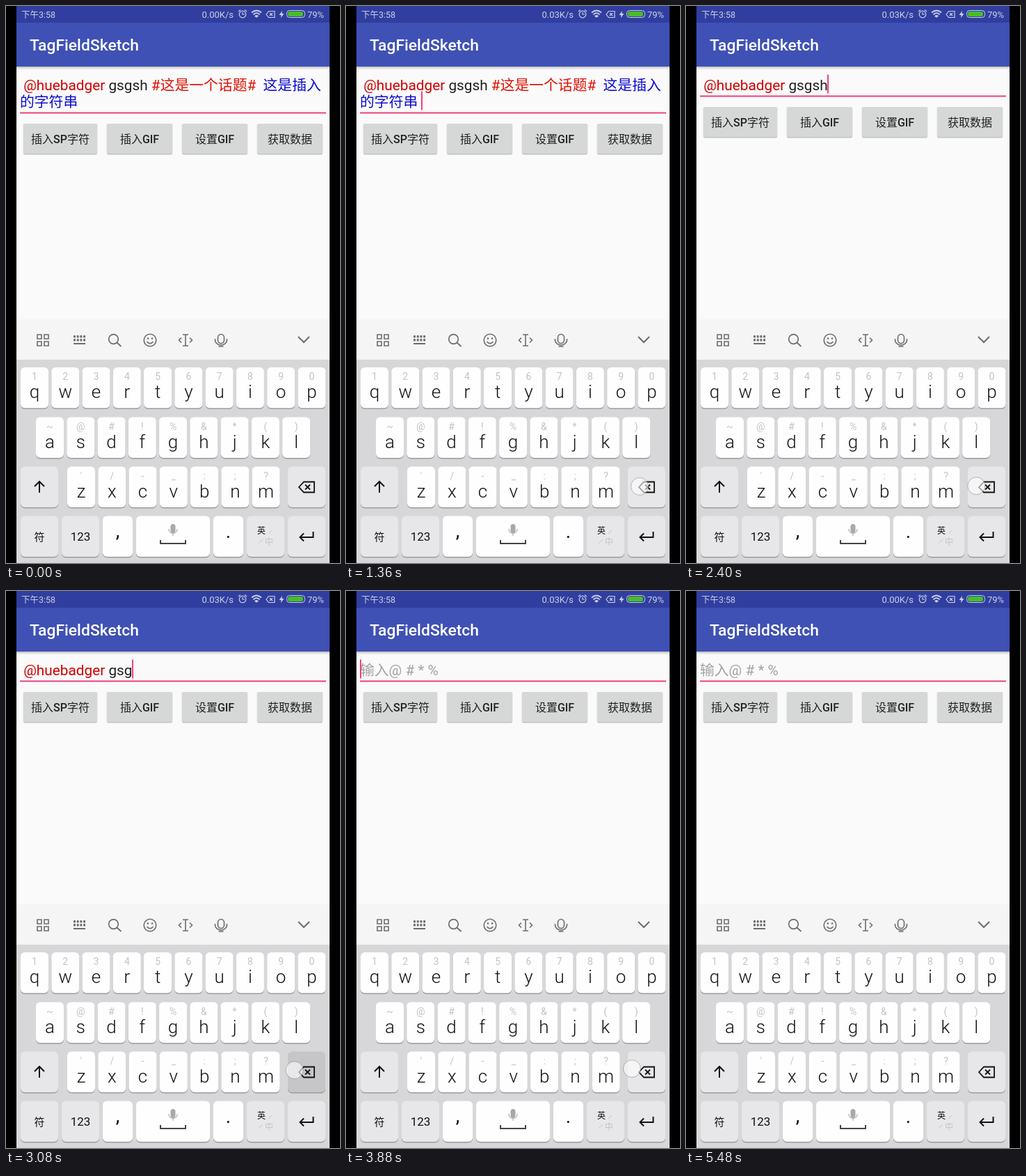
An HTML page with a canvas that plays this animation: 480 px wide and 800 px high, repeating every 5520 ms.

```html
<!DOCTYPE html>
<html lang="zh-CN">
<head>
<meta charset="utf-8">
<style>
html, body { margin: 0; width: 100%; height: 100%; overflow: hidden; background: #000; }
canvas { display: block; }
</style>
</head>
<body>
<canvas id="stage" width="480" height="800"></canvas>
<script>
const c = document.getElementById('stage').getContext('2d');
const LOOP = 5520, BLINK = 500;
const FAMILY = 'Roboto, "Noto Sans CJK SC", "Noto Sans CJK", sans-serif';
const INK = '#212121', TOOL = '#6c6c70', DARK = '#111';
const KEY = '#fefefe', SPECIAL = '#e7e7e9', PALE = '#c3c3c6';

// touch start times on the delete key; the first EDITS ones each remove something
const taps = [1320, 1880, 2400, 2710, 3020, 3225, 3430, 3635, 3840, 4045];
const EDITS = 8, DELETE_AGE = 130, RELEASE_AGE = 140, FADE = 130;

function rect(x, y, w, h, fill, r = 0) {
  c.fillStyle = fill;
  c.beginPath();
  c.roundRect(x, y, w, h, r);
  c.fill();
}

function text(s, x, y, size, color, align = 'left', weight = 400) {
  c.font = `${weight} ${size}px ${FAMILY}`;
  c.textAlign = align;
  c.fillStyle = color;
  c.fillText(s, x, y);
  return x + c.measureText(s).width;
}

function icon(x, y, path, color, width = 1.6, filled = false) {
  c.save();
  c.translate(x, y);
  c.strokeStyle = c.fillStyle = color;
  c.lineWidth = width;
  const p = new Path2D(path);
  if (filled) c.fill(p); else c.stroke(p);
  c.restore();
}

function ring(r, x = 0, y = 0) {
  return `M${x - r} ${y}a${r} ${r} 0 1 0 ${2 * r} 0a${r} ${r} 0 1 0 ${-2 * r} 0`;
}

function statusBar(t) {
  const light = '#ccd0e6';
  rect(15, 0, 450, 24, '#303f9f');
  text('下午3:58', 22, 16.5, 12.5, light);
  const rate = t >= 440 && t < 4440 ? '0.03K/s' : '0.00K/s';
  text(rate, 327, 16.5, 13, light, 'right');
  icon(340, 12, ring(4.8) + 'M0-3V0H3M-6-4L-3-6.5M6-4L3-6.5', light, 1.2);
  icon(360, 12, 'M-7-2.5Q0-8.5 7-2.5M-4.6.3Q0-4 4.6.3M-2.3 3Q0 1 2.3 3', light, 1.7);
  icon(360, 15, ring(1.4), light, 1, true);
  icon(380, 12, 'M-6 0L-2.5-4.5H6V4.5H-2.5ZM-1-2L3 2M3-2L-1 2', light, 1.2);
  icon(396, 12, 'M1-5L-3.5 1H-.5L-1 5L3.5-1H.5Z', light, 1, true);
  c.strokeStyle = light;
  c.lineWidth = 1;
  c.beginPath();
  c.roundRect(403.5, 6.5, 26, 10, 4);
  c.stroke();
  rect(405, 8, 22, 7, '#48bd28', 3);
  text('79%', 433, 16.5, 13, light);
}

function content(stage, t, lastEdit) {
  const size = 20.8, accent = '#f0407f';
  let x = 20, y = 121;
  if (stage === EDITS) {
    text('输入@ # * %', x, y, size, '#a2a2a2');
  } else {
    x = text(' @huebadger ', x, y, size, '#d00000');
    x = text('gsgsh'.slice(0, 7 - stage), x, y, size, INK);
    if (stage < 2) x = text(' #这是一个话题# ', x, y, size, '#e01000');
    if (stage < 1) {
      text(' 这是插入', x, y, size, '#0c0cd0');
      y += 24;
      x = text('的字符串 ', 20, y, size, '#0c0cd0');
    }
  }
  rect(20, y + 7.5, 440, 2, accent);
  if (!(Math.floor((t - lastEdit) / BLINK) & 1)) rect(Math.floor(x), y - 22.5, 2, 27, accent);

  const top = y + 24;
  [['插入SP字符', 25, 106], ['插入GIF', 145, 94], ['设置GIF', 253, 94], ['获取数据', 361, 94]]
    .forEach(([label, bx, w]) => {
      rect(bx - 1, top, w + 2, 43, '#ececec', 3);
      rect(bx, top + 1.5, w, 43, '#c2c2c2', 2);
      rect(bx, top, w, 43, '#d6d7d7', 2);
      text(label, bx + w / 2, top + 28, 16, INK, 'center', 500);
    });
}

function toolbar() {
  rect(15, 450, 450, 58, '#f5f5f6');
  icon(53, 480, 'M-8-8h6v6h-6zM2-8h6v6h-6zM-8 2h6v6h-6zM2 2h6v6h-6z', TOOL);
  for (let i = 0; i < 8; i++) rect(97 + i % 4 * 4.7, 473 + (i >> 2) * 5, 3, 3.4, TOOL, 1);
  rect(97, 484, 17, 2, TOOL);
  icon(156, 480, ring(6.8, -1.5, -1.5) + 'M3.5 3.5L9.5 9', TOOL, 1.7);
  icon(207, 480, ring(8.8) + 'M-4.5 2Q0 7.5 4.5 2', TOOL);
  icon(204, 477.5, ring(1.3) + ring(1.3, 6, 0), TOOL, 1, true);
  icon(258, 480, 'M-4-8H4M0-8V8M-4 8H4M-6-3.5L-9.5 0L-6 3.5M6-3.5L9.5 0L6 3.5', TOOL);
  icon(309, 480, 'M-4.5-4a4.5 4.5 0 0 1 9 0v4a4.5 4.5 0 0 1-9 0zM-8.5-2v2a8.5 7 0 0 0 17 0v-2M-3.5 9H3.5', TOOL);
  icon(428, 479, 'M-8-4L0 4L8-4', TOOL, 2);
}

function key(x, y, w, fill = KEY) {
  rect(x, y + 1.5, w, 58.5, '#9c9c9f', 6);
  rect(x, y, w, 58.5, fill, 6);
}

function letterRow(letters, hints, left, top) {
  [...letters].forEach((ch, i) => {
    const x = left + i * 44.27, mid = x + 20;
    key(x, top, 40);
    text(hints[i], mid, top + 18, 14, PALE, 'center');
    text(ch, mid, top + 44, 26, DARK, 'center', 300);
  });
}

function keyboard(pressed) {
  rect(15, 508, 450, 292, '#d7d7d9');
  letterRow('qwertyuiop', '1234567890', 21, 519);
  letterRow('asdfghjkl', '~@#!%&*()', 43, 590.5);
  letterRow('zxcvbnm', "'/-_:;?", 88, 661.5);

  key(21, 661.5, 54, SPECIAL);
  icon(48, 691, 'M0 8V-8M-7-1L0-8L7-1', DARK, 2);
  key(405, 661.5, 54, pressed ? '#c6c6c9' : SPECIAL);
  icon(432, 691, 'M-11 0L-4-7.5H11V7.5H-4ZM-2-3.5L5 3.5M5-3.5L-2 3.5', DARK, 1.8);

  const y = 732.5;
  key(21, y, 54, SPECIAL);
  text('符', 48, 768, 15, DARK, 'center');
  key(80, y, 54, SPECIAL);
  text('123', 107, 768, 17, DARK, 'center');
  key(139, y, 43);
  text(',', 160.5, 763, 28, DARK, 'center');
  key(187, y, 106);
  rect(236.5, 744, 7, 13, '#a9a9ab', 3.5);
  icon(240, 753, 'M-6-2v1a6 5.5 0 0 0 12 0v-1M0 4.5V8', '#b4b4b6', 1.3);
  icon(240, 770, 'M-18-3V2H18V-3', '#444', 2);
  key(298, y, 43);
  text('.', 319.5, 764, 28, DARK, 'center');
  key(346, y, 54, SPECIAL);
  text('英', 367, 758, 12, DARK, 'center');
  text('中', 378, 774, 12, PALE, 'center');
  icon(373, 762, 'M9-9L4-4M-4 4L-10 10', PALE, 1);
  key(405, y, 54, SPECIAL);
  icon(432, 762, 'M9.5-7V1H-9M-4-4.5L-9.5 1L-4 6.5', DARK, 2);
}

function touch(start, age) {
  const alpha = Math.min(1, 1 - (age - RELEASE_AGE) / FADE);
  if (alpha <= 0) return;
  // the finger drifts up and left from tap to tap
  const k = (start - taps[0]) / 2520;
  c.globalAlpha = alpha;
  c.beginPath();
  c.arc(422 - 11 * k, 690 - 4 * k * k, 12.5, 0, 7);
  c.fillStyle = 'rgba(255,255,255,.6)';
  c.fill();
  c.strokeStyle = 'rgba(120,120,125,.5)';
  c.lineWidth = 1;
  c.stroke();
  c.globalAlpha = 1;
}

function draw(now) {
  const t = now % LOOP;
  const edits = taps.slice(0, EDITS).map(s => s + DELETE_AGE).filter(s => s <= t);
  const start = taps.findLast(s => s <= t) ?? -LOOP;
  const age = t - start;

  rect(0, 0, 480, 800, '#000');
  rect(15, 0, 450, 800, '#fafafa');
  statusBar(t);
  rect(15, 87, 450, 2, '#cdcdcd');
  rect(15, 89, 450, 2, '#ebebeb');
  rect(15, 24, 450, 63, '#3f51b5');
  text('TagFieldSketch', 34, 64, 22.9, '#fff', 'left', 500);
  content(edits.length, t, edits.at(-1) ?? 120);
  toolbar();
  keyboard(age >= 50 && age < RELEASE_AGE);
  touch(start, age);
  requestAnimationFrame(draw);
}
requestAnimationFrame(draw);
</script>
</body>
</html>
```
